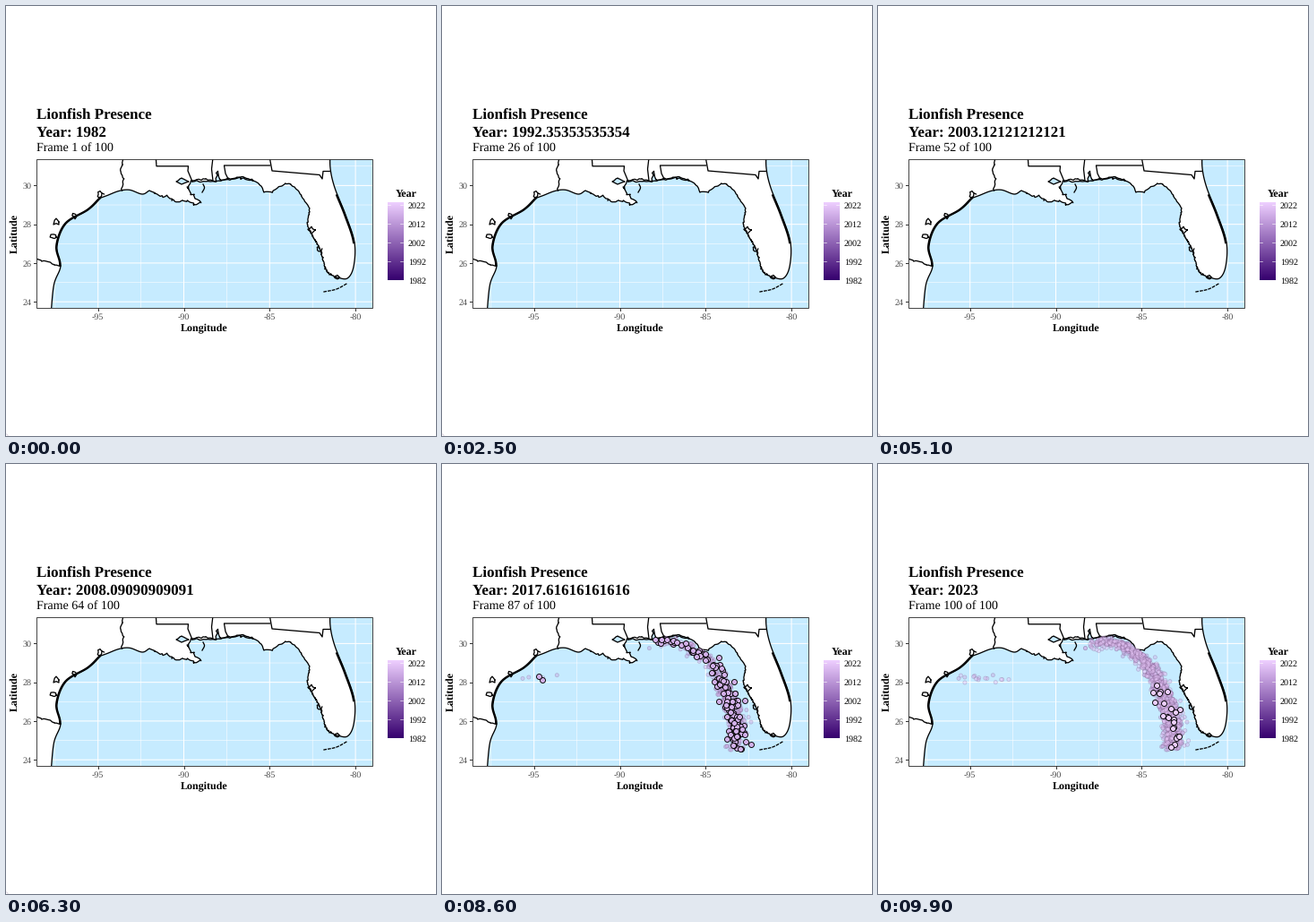
A matplotlib script for the animation above (10000 ms loop, 480 px wide and 480 px high).

```python
import numpy as np
import matplotlib.pyplot as plt
from matplotlib.animation import FuncAnimation
from matplotlib.patches import Rectangle, Polygon

plt.rcParams["font.family"] = "Liberation Serif"
plt.rcParams["text.hinting"] = "none"

SIZE, DPI, FRAMES = 480, 72, 100
START, END = 1982, 2023
LEFT, RIGHT, TOP, BOTTOM = 34.2, 409.2, 171.4, 337.4
SEA, DARK, GREY = "#c6ebff", "#333333", "#4d4d4d"
LOW, HIGH = np.array([54, 0, 110]) / 255, np.array([238, 207, 255]) / 255

fig = plt.figure(figsize=(SIZE / DPI, SIZE / DPI), dpi=DPI, facecolor="white")
ax = fig.add_axes([0, 0, 1, 1])
ax.axis("off")
panel = Rectangle((LEFT, TOP), RIGHT - LEFT, BOTTOM - TOP, fc=SEA, ec="none", zorder=0)
ax.add_patch(panel)


def px(lon):
    return 102.7 + (lon + 95) * 19.16


def py(lat):
    return 200.4 + (30 - lat) * 21.63


def shade(year):
    return LOW + (HIGH - LOW) * (year - START) / (END - START)


def label(x, y, s, size, **kw):
    return ax.text(x, y, s, fontsize=size, **kw)


def line(points, color="black", lw=1.3, z=3):
    mark, = ax.plot(*np.transpose(points), color=color, lw=lw, zorder=z, snap=False)
    mark.set_clip_path(panel)


def area(points, color, z=2):
    patch = Polygon(points, fc=color, ec="black", lw=1.3, zorder=z, joinstyle="round")
    ax.add_patch(patch)
    patch.set_clip_path(panel)


def curve(points, steps=10):
    """Smooth path through key points."""
    p = np.array(points, float)
    m = np.gradient(p, axis=0)
    u = np.linspace(0, len(p) - 1, (len(p) - 1) * steps + 1)
    i = np.minimum(u.astype(int), len(p) - 2)
    t = (u - i)[:, None]
    return ((2 * t**3 - 3 * t**2 + 1) * p[i] + (t**3 - 2 * t**2 + t) * m[i]
            + (3 * t**2 - 2 * t**3) * p[i + 1] + (t**3 - t**2) * m[i + 1])


def rough(points, amp, seed):
    """Polyline with a jagged, seeded shore."""
    rng = np.random.default_rng(seed)
    p = np.array(points, float)
    dist = np.r_[0, np.cumsum(np.hypot(*np.diff(p, axis=0).T))]
    s = np.union1d(dist, np.arange(0, dist[-1], 2.5))
    path = np.column_stack([np.interp(s, dist, c) for c in p.T])
    path[1:-1] += amp * rng.normal(size=(len(s) - 2, 2))
    return path


def inlet(x, y, r, seed):
    rng = np.random.default_rng(seed)
    a = np.linspace(0, 2 * np.pi, 9)
    d = r * rng.uniform(0.3, 1.1, 9)
    line(np.column_stack([x + d * np.cos(a), y + d * np.sin(a)]))


# Grid and axes
for first, lw in ((0.5, 0.53), (0, 1.07)):
    for k in range(4):
        x, y = px(-95 + 5 * (k - first)), py(24 + 2 * (k + first))
        line([(x, TOP), (x, BOTTOM)], "white", lw, 1)
        line([(LEFT, y), (RIGHT, y)], "white", lw, 1)
for k in range(4):
    lon, lat = -95 + 5 * k, 24 + 2 * k
    ax.plot([px(lon)] * 2, [BOTTOM, BOTTOM + 2.8], color=DARK, lw=1)
    ax.plot([LEFT - 2.8, LEFT], [py(lat)] * 2, color=DARK, lw=1)
    label(px(lon), 349.8, f"{lon}", 10, color=GREY, ha="center")
    label(29, py(lat) + 3.5, f"{lat}", 10, color=GREY, ha="right")
ax.add_patch(Rectangle((LEFT, TOP), RIGHT - LEFT, BOTTOM - TOP,
                       fill=False, ec=DARK, lw=0.9, zorder=9))
label(221.5, 362.8, "Longitude", 12, weight="bold", ha="center")
label(12.9, 254.5, "Latitude", 12, weight="bold", rotation=90, ha="center",
      va="center").set_x(9.6)

# Coast
texas = curve([(50, 345), (53.5, 311), (61, 290), (57, 268), (67, 243), (92, 227.5), (106, 214)])
west = curve([(106, 214), (113, 211.5), (126, 206.5), (138, 205.3), (152, 210), (160, 206)])
delta = rough([(160, 206), (172, 211), (180, 212), (185, 218), (203, 217.5), (210, 222),
               (217, 219), (207, 209), (203, 202), (208, 196)], 0.9, 4)
panhandle = rough([(208, 196), (234, 196), (236, 184), (239, 194), (262, 191), (275, 194),
                   (283, 199), (288, 208), (297, 207), (312, 198), (318, 199), (330, 211),
                   (339, 226)], 0.5, 2)
gulf = rough(curve([(339, 226), (337, 245), (342, 257), (350, 270), (354, 284), (358, 296),
                    (369, 303)]), 0.5, 5)
atlantic = curve([(369, 303), (381, 304), (388, 291), (389, 264), (379, 233), (367, 203),
                  (362, 181), (362, 160)])
area(np.vstack([[(20, 160), (20, 345)], texas, west, delta, panhandle, gulf, atlantic]), "white")
area(rough([(190, 196), (196, 192), (204, 196), (196, 199)], 0.3, 1), SEA)

# Lagoons, bays and islands
line(texas[20:] - (0.9, 0.3), lw=2)
line(atlantic[30:48] - (0.9, 0), lw=2.3)
line(rough([(208, 195), (222, 193), (234, 196), (262, 192), (276, 195)], 0.6, 7))
line(curve([(220, 199), (221.5, 203), (219, 208)]))
for n, (x, y, r) in enumerate([(53, 258, 4), (56, 241, 4), (77, 234, 4), (105, 210, 5),
                               (341, 250, 4), (349, 271, 4), (370, 303, 3)]):
    inlet(x, y, r, n)
keys = curve([(355, 319), (369, 316), (382, 309)], 12)
for k in range(0, 24, 4):
    line(keys[k:k + 3])

# Borders
line(rough([(30, 281.5), (40, 284), (49, 286), (54, 289), (61, 290)], 0.3, 3))
line(rough([(130.5, 165), (130.5, 176), (127.5, 184), (131, 193), (129.5, 206)], 0.4, 3))
line([(167, 165), (168, 178.8), (203.5, 178.8), (203, 184), (208, 196)])
line([(231.5, 165), (229.5, 182), (231, 195)])
line([(248, 193), (245, 187), (243.5, 178), (294.5, 178)])
line([(293.5, 165), (297, 184), (350, 188.5), (353, 193), (354, 184.5), (362, 184.5)])

# Sightings per year
route = curve([(234, 206), (258, 198), (280, 207), (303, 227), (317, 256), (327, 286), (328, 317)])


def sightings(year):
    rng = np.random.default_rng(year)
    last = year == END
    n = 22 if last else round(130 / (1 + np.exp(1.2 * (2013.3 - year))))
    u = rng.uniform(0.6, 1, n) if last else rng.beta(1.7, 1, n)
    x, y = (np.interp(u, np.linspace(0, 1, len(route)), c) for c in route.T)
    x += 5 * np.clip(rng.normal(size=n), -2, 2) + u * (3 * rng.exponential(size=n) - 2)
    y += 2.5 * rng.normal(size=n)
    shore = 194 + np.clip(0.75 * (x - 270), 0, 19)
    main = np.column_stack([x, np.clip(y, shore, 319)])
    far = n // 60
    return np.vstack([main, np.column_stack([rng.uniform(88, 147, far),
                                             rng.normal(239.5, 2, far)])])


years = list(range(2010, END + 1))
groups = [sightings(y) for y in years]
begins = [round((y - START) * (FRAMES - 1) / (END - START)) for y in years]
marks = np.vstack(groups)
tones = np.array([(*shade(y), 0.45) for y, g in zip(years, groups) for _ in g])
before = np.cumsum([0] + [len(g) for g in groups])

trail = ax.scatter([], [], s=4.2 ** 2, linewidths=0.7, edgecolors=(0.45, 0.32, 0.5, 0.3), zorder=5)
now = ax.scatter([], [], s=6 ** 2, linewidths=0.9, edgecolors="black", zorder=6)

# Legend
label(435, 213, "Year", 12, weight="bold")
ax.imshow(np.linspace(HIGH, LOW, 128)[:, None, :], extent=(426, 443.2, 306.4, 220),
          aspect="auto", zorder=2)
for year in range(START, END, 10):
    y = 306.4 - 86.4 * (year - START) / (END - START)
    for x in (426, 439.8):
        ax.plot([x, x + 3.4], [y, y], color="white", lw=0.6, zorder=3)
    label(448.8, y + 3.9, f"{year}", 10)

label(33.8, 127.2, "Lionfish Presence", 16.95, weight="bold")
title = label(33.8, 145.4, "", 16.95, weight="bold")
counter = label(33.8, 163.2, "", 13.95)
ax.set(xlim=(0, SIZE), ylim=(SIZE, 0))


def update(k):
    title.set_text(f"Year: {START + (END - START) * k / (FRAMES - 1):.15g}")
    counter.set_text(f"Frame {k + 1} of {FRAMES}")
    i = np.searchsorted(begins, k, side="right") - 1
    n = before[max(i, 0)]
    trail.set_offsets(marks[:n])
    trail.set_facecolor(tones[:n])
    now.set_offsets(groups[i] if i >= 0 else np.empty((0, 2)))
    now.set_facecolor(shade(years[i]))
    return title, counter, trail, now


anim = FuncAnimation(fig, update, frames=FRAMES, interval=100, repeat=True, repeat_delay=0)
plt.show()
```
